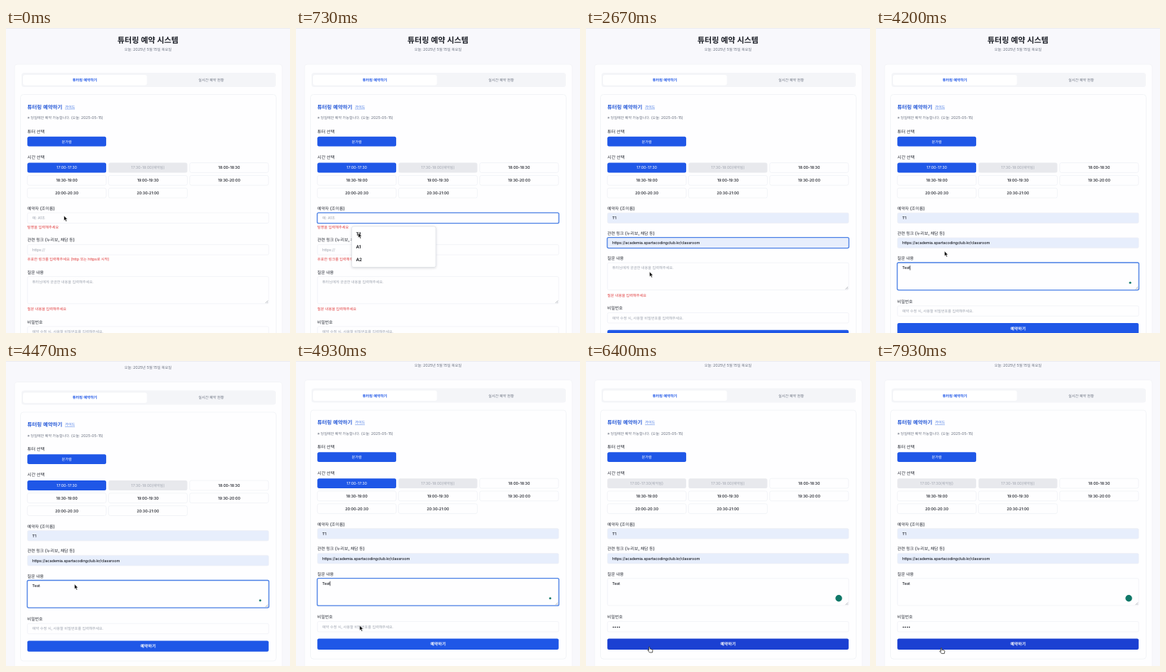
These frames come from a looping animation (400x429 px, 8000 ms). An HTML page:

```html
<!DOCTYPE html>
<html lang="ko">
<head>
<meta charset="utf-8">
<title>튜터링 예약 시스템</title>
<style>
  html, body { margin: 0; width: 100%; height: 100%; overflow: hidden; background: #f8f8fc; }
  svg { display: block; width: 100vw; height: 100vh; }
  text {
    font-family: Inter, "Noto Sans CJK KR", "Noto Sans CJK", "Noto Sans", sans-serif;
    letter-spacing: -.02em;
    text-rendering: geometricPrecision;
    white-space: pre;
  }
  .ko { font-size: .94em; letter-spacing: 0; }
  .menu text { letter-spacing: 0; }
  .field { fill: #fefeff; stroke: #eef0f5; stroke-width: .7; }
  .ring { fill: none; stroke: #4a80e6; stroke-width: 1.3; }
  .caret { stroke: #15181f; stroke-width: .7; }
</style>
</head>
<body>
<svg id="stage" viewBox="0 0 400 429" xmlns="http://www.w3.org/2000/svg"></svg>
<script>
const LOOP = 8000, ERROR_H = 9.7;
const BLUE = '#1f57e7', INK = '#1b1e26', GRAY = '#6b7280', PALE = '#9da3ae', RED = '#e03c3c';

// Markup helpers; cy is the vertical centre of a line of text.
const label = (x, cy, str, { size = 5.5, fill = INK, weight = 400, anchor = 'start', id = '' } = {}) =>
  `<text ${id && `id="${id}"`} x="${x}" y="${cy + size * .36}" font-size="${size}" font-weight="${weight}"
    fill="${fill}" text-anchor="${anchor}">${ko(str)}</text>`;
const ko = s => s.replace(/[가-힣]+/g, '<tspan class="ko">$&</tspan>');
const box = (x, y, w, h, r, attrs) => `<rect x="${x}" y="${y}" width="${w}" height="${h}" rx="${r}" ${attrs}/>`;
const mid = (x, cy, str, o) => label(x, cy, str, { anchor: 'middle', ...o });
const heading = (cy, str, size = 6.3) => label(30, cy, str, { size, weight: 500, fill: '#2a2e37' });
const error = (id, cy, str) => label(30, cy, str, { id, fill: RED });

function field(id, y, h, hint) {
  const cy = y + 7.2;
  return box(30.2, y, 339.8, h, 2, `class="field" id="${id}Box"`) +
    label(37, cy, hint, { fill: PALE, id: id + 'Hint' }) +
    label(37, cy, '', { id: id + 'Text', weight: 500 }) +
    `<g id="${id}Focus">${box(29.9, y - .2, 340.4, h + .4, 2, 'class="ring"')}
     <path id="${id}Caret" class="caret" d="M0 ${cy - 3.3}v6.6"/></g>`;
}

const chips = {
  plain: ['#fefeff', INK, '#eceff4'],
  picked: [BLUE, '#fff', 'none'],
  taken: ['#e8e9ed', '#a4a9b3', 'none']
};
function chip(x, y, str, kind = 'plain') {
  const [bg, fg, edge] = chips[kind];
  return box(x, y, 111, 13.8, 2.5, `fill="${bg}" stroke="${edge}" stroke-width=".7"`) +
    mid(x + 55.5, y + 6.9, str, { fill: fg, weight: kind === 'plain' ? 500 : 400 });
}
const slot = (i, str, kind) => chip(30.1 + i % 3 * 114.3, 189.6 + Math.floor(i / 3) * 17.8, str, kind);

function menu(id, y, items) {
  return `<g id="${id}" class="menu">` +
    box(78.5, y, 118.5, 57.5, 2.5, 'fill="#fff" stroke="#d6d9df" stroke-width=".6" filter="url(#soft)"') +
    items.map((s, i) => label(84.5, y + 11 + i * 17.8, s, { size: 6.3, weight: 600, fill: '#101217' })).join('') + '</g>';
}

const slots = ['18:00-18:30', '18:30-19:00', '19:00-19:30', '19:30-20:00', '20:00-20:30', '20:30-21:00'];

const stage = document.getElementById('stage');
stage.innerHTML = `
<defs><filter id="soft" x="-10%" y="-10%" width="120%" height="130%">
  <feDropShadow dx="0" dy="1" stdDeviation="1.5" flood-color="#334" flood-opacity=".2"/></filter></defs>
<g id="page">
  ${mid(200, 16.3, '튜터링 예약 시스템', { size: 11.7, weight: 700 })}
  ${mid(200, 30.2, '오늘: 2025년 5월 15일 목요일', { fill: GRAY })}
  ${box(12, 51, 377, 440, 4, 'fill="#fefeff" stroke="#f2f3f7" stroke-width=".8"')}
  ${box(22, 63, 358, 20, 3.5, 'fill="#f4f5f8"')}
  ${box(24, 66, 174.5, 14.5, 3, 'fill="#fff"')}
  ${mid(111, 73, '튜터링 예약하기', { fill: BLUE, weight: 600 })}
  ${mid(289, 73, '실시간 예약 현황', { fill: GRAY, weight: 500 })}
  ${box(20.5, 93.5, 360, 350, 4, 'fill="#fefeff" stroke="#eff1f5" stroke-width=".8"')}
  ${label(30, 110.7, '튜터링 예약하기', { size: 7.86, weight: 600, fill: '#2458d8' })}
  ${label(83, 110.8, '가이드', { fill: '#3f74e4' })}
  <path d="M83 114h14" stroke="#3f74e4" stroke-width=".5"/>
  ${label(30, 126.5, '※ 당일에만 예약 가능합니다. (오늘: 2025-05-15)', { size: 5.4, fill: GRAY })}
  ${heading(145.2, '튜터 선택', 6.6)}
  ${chip(30.1, 152.7, '문가람', 'picked')}
  ${heading(181.6, '시간 선택', 6.6)}
  <g id="slotFree">${slot(0, '17:00-17:30', 'picked')}</g>
  <g id="slotTaken">${slot(0, '17:00-17:30(예약됨)', 'taken')}</g>
  ${slot(1, '17:30-18:00(예약됨)', 'taken')}
  ${slots.map((s, i) => slot(i + 2, s)).join('')}
  ${heading(254, '예약자 (조이름)')}
  ${field('name', 260, 14.5, '예: A1조')}
  ${error('nameError', 280, '팀명을 입력해주세요')}
  <g id="linkPart">
    ${heading(288.5, '관련 링크 (누리보, 채담 등)')}
    ${field('link', 294.9, 14.5, 'https://')}
    ${error('linkError', 315, '유효한 링크를 입력해주세요 (http 또는 https로 시작)')}
    <g id="askPart">
      ${heading(324, '질문 내용')}
      ${field('ask', 330.2, 38.2, '튜터님에게 궁금한 내용을 입력해주세요.')}
      <path d="M365.5 367.5l3.5-3.5M367.6 367.5l1.4-1.4" stroke="#858a94" stroke-width=".6"/>
      <circle id="badge" cy="358.2" fill="#0f7768"/>
      ${error('askError', 376, '질문 내용을 입력해주세요')}
      <g id="pwPart">
        ${heading(384.5, '비밀번호')}
        ${field('pw', 390.8, 14.5, '예약 수정 시, 사용할 비밀번호를 입력해주세요.')}
        ${box(30.1, 415, 339.8, 15.3, 2, `id="send" fill="${BLUE}"`)}
        ${mid(200, 422.6, '예약하기', { size: 6.3, weight: 600, fill: '#fff' })}
      </g>
    </g>
  </g>
  ${menu('nameMenu', 279, ['T1', 'A1', 'A2'])}
  ${menu('linkMenu', 314, ['https://academia.spartacodi...', 'https://www.notion.so/', 'helper@example.com'])}
</g>
<path d="M0 .4h400" stroke="#e6e8ec" stroke-width=".8"/>
<g id="pointer">
  <path id="arrow" d="M-.4 0v7l1.6-1.4 1.2 2.6 1.3-.6-1.2-2.5h2.1z" fill="#000" stroke="#fff" stroke-width=".6"/>
  <path id="hand" d="M-.7.2q.7-.7 1.3 0l.3 2.6 3.2.8q.8.3.7 1.2l-.5 3.1h-4l-2.5-3q-.3-.9.8-.6l.9.6z"
    fill="#fff" stroke="#111" stroke-width=".7" stroke-linejoin="round"/>
</g>`;

const $ = id => document.getElementById(id);
const show = (id, on) => $(id).style.display = on ? '' : 'none';
const shift = (id, x, y) => $(id).setAttribute('transform', `translate(${x} ${y})`);
const ease = p => p * p * (3 - 2 * p);

// Interpolates rows of [time, ...values].
function track(rows, t, curve = ease) {
  const i = rows.findIndex(r => r[0] > t);
  if (i < 0) return rows[rows.length - 1].slice(1);
  if (!i) return rows[0].slice(1);
  const a = rows[i - 1], b = rows[i], p = curve((t - a[0]) / (b[0] - a[0]));
  return a.slice(1).map((v, k) => v + (b[k + 1] - v) * p);
}

const pointerPath = [
  [0, 82, 264], [390, 82, 264], [620, 88, 288], [860, 88, 288], [1200, 82.3, 304.8],
  [1600, 82.3, 304.8], [1860, 100, 324], [2060, 100, 324], [2400, 90.2, 343.6], [2460, 90.2, 343.6],
  [2530, 89.8, 342.8], [2920, 89.8, 342.8], [3200, 96.8, 313.8], [4560, 96.8, 313.8], [4930, 90, 372],
  [5460, 90, 372], [5660, 89, 402], [6330, 89, 402], [6800, 92, 403.5]
];
const scrollPath = [[4370, 0], [4470, 21.5], [4600, 24.4]];

// Focus window and the moments at which the value changes.
const inputs = {
  name: { from: 70, to: 1260, edits: [[800, 'T1']], fillAt: 800 },
  link: { from: 1260, to: 2700, edits: [[2000, 'https://academia.spartacodingclub.kr/classroom']], fillAt: 2000 },
  ask: { from: 2700, to: 4960, edits: [[3665, 'T'], [3770, 'Te'], [3850, 'Tes'], [3930, 'Test']] },
  pw: { from: 4960, to: 6130, edits: [[5265, '•'], [5465, '••'], [5600, '•••'], [5730, '••••']] }
};

function drawInput(id, t) {
  const { from, to, edits, fillAt } = inputs[id];
  const done = edits.filter(e => e[0] <= t), last = done[done.length - 1];
  const text = $(id + 'Text');
  text.textContent = last ? last[1] : '';
  show(id + 'Hint', !last);
  show(id + 'Focus', t >= from && t < to);
  $(id + 'Box').style.fill = t >= fillAt ? '#e7eefc' : '';
  const since = t - (last ? Math.max(last[0], from) : from);
  show(id + 'Caret', since % 1000 < 500);
  shift(id + 'Caret', 37.2 + (last ? text.getComputedTextLength() : 0), 0);
}

function drawError(id, next, t) {
  const on = t < inputs[id].edits[0][0];
  show(id + 'Error', on);
  shift(next, 0, on ? ERROR_H : 0);
}

function draw(t) {
  Object.keys(inputs).forEach(id => drawInput(id, t));
  drawError('name', 'linkPart', t);
  drawError('link', 'askPart', t);
  drawError('ask', 'pwPart', t);

  show('nameMenu', t >= 70 && t < 800);
  show('linkMenu', t >= 1260 && t < 2000);
  show('slotFree', t < 6400);
  show('slotTaken', t >= 6400);

  const wide = t >= 4960;
  show('badge', t >= 3900);
  $('badge').setAttribute('cx', wide ? 356 : 358);
  $('badge').setAttribute('r', wide ? 4.7 : 1.5);

  const hover = t >= 5560;
  $('send').setAttribute('fill', hover ? '#1b40d2' : BLUE);
  show('hand', hover);
  show('arrow', !hover);
  shift('page', 0, -track(scrollPath, t, p => p)[0]);
  shift('pointer', ...track(pointerPath, t));
}

const start = performance.now();
function tick() {
  draw((performance.now() - start) % LOOP);
  requestAnimationFrame(tick);
}
tick();
</script>
</body>
</html>
```
